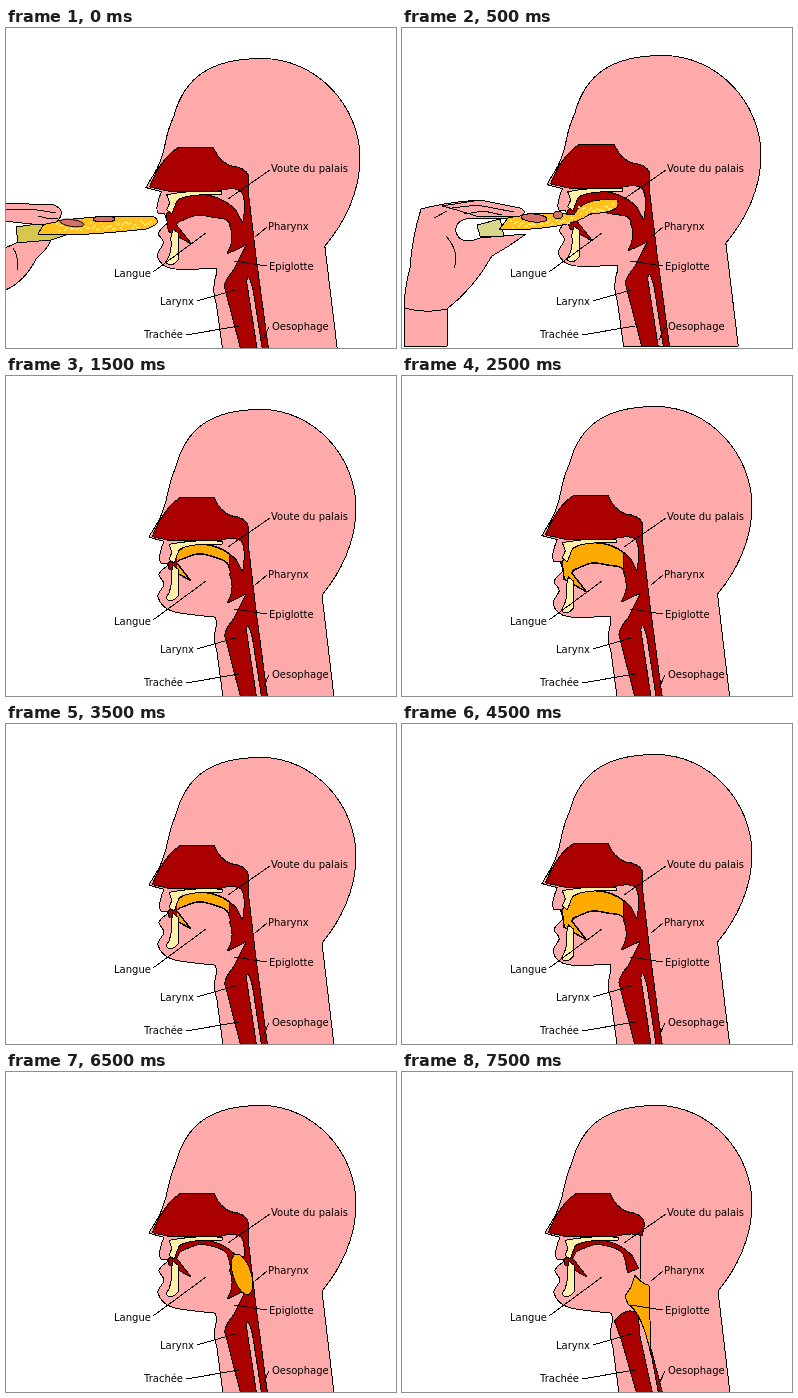
These frames come from a looping animation (390x320 px, 8 s). An HTML page:

```html
<!DOCTYPE html>
<html lang="fr">
<head>
<meta charset="utf-8">
<title>Déglutition</title>
<style>
  html, body { margin: 0; width: 100%; height: 100%; overflow: hidden; background: #fff; }
  svg { display: block; width: 390px; height: 320px; }
  path, ellipse { shape-rendering: crispEdges; stroke-linejoin: round; vector-effect: non-scaling-stroke; }
  text { font: 10px "DejaVu Sans", sans-serif; fill: #000; }
</style>
</head>
<body>
<svg viewBox="0 0 390 320">
  <g id="scene"></g>
  <path fill="none" stroke="#000" d="M264 142L222 171M261 199L249 209M261 238L228 233M263 299L257 312M147 244L200 205M191 273L229 262M180 307L233 298"/>
  <text x="265" y="144">Voute du palais</text>
  <text x="262" y="202">Pharynx</text>
  <text x="263" y="242">Epiglotte</text>
  <text x="266" y="302">Oesophage</text>
  <text x="108" y="249">Langue</text>
  <text x="154" y="277">Larynx</text>
  <text x="138" y="310">Trachée</text>
</svg>
<script>
const SKIN = '#ffaaaa', RED = '#aa0000', FOOD = '#ffaa00', BONE = '#fff0aa', CHEESE = '#ffc220', MEAT = '#d4716a';

const shape = (d, color, extra = '') => `<path d="${d}" fill="${color}" stroke="#000" ${extra}/>`;
const crease = d => shape(d, 'none');
const blob = (x, y, rx, ry, turn, color) =>
  `<ellipse rx="${rx}" ry="${ry}" transform="translate(${x} ${y}) rotate(${turn})" fill="${color}" stroke="#000"/>`;
// Overlapping parts under one outline
const merge = (d, color) => `<path d="${d}" fill="none" stroke="#000" stroke-width="2"/><path d="${d}" fill="${color}"/>`;

// Continues a path smoothly through points
function through(text, move) {
  const p = text.split(' ').map(s => move(...s.split(',').map(Number)));
  const at = i => p[Math.max(0, Math.min(p.length - 1, i))];
  const toward = (i, dir) => at(i).map((v, k) => v + dir * (at(i + 1)[k] - at(i - 1)[k]) / 6);
  return `L${p[0]}` + p.slice(1).map((q, i) => `C${toward(i, 1)} ${toward(i + 1, -1)} ${q}`).join('');
}

const skull = 'M217 321H328L316 219C335 196 350 165 350 132C350 80 308 33 255 33C205 33 180 52 170 90C160 112 164 116 157 134C153 147 147 152 143 161L158 165Q151 182 155 187H161';
const throat = 'L211 247Q206 262 211 276L217 321Z';
const nose = 'M147 160Q158 132 174 122H208Q216 140 231 141Q242 144 242 152';
const noseFloor = 'Q230 159 212 164H165Z';
const openPipes = nose + 'V170L249 230 261 321H256L247 262Q241 240 240 255L250 321H235L220 262Q217 256 228 243L241 217 222 226Q230 212 224 198L230 195 237 196Q241 175 236 165' + noseFloor;
const shutPipes = nose + 'L240 163' + noseFloor + 'M213 249Q224 234 236 242L237 262 250 321H235L220 268ZM249 278L260 321H257Z';
const palate = 'M163 168Q190 163 216 165V168Q180 167 173 174L168 187 163 183 166 176Z';
const tooth = 'M167 189L172 193V220Q165 228 160 222Q167 212 165 198Z';
const swallowed = 'M233 203Q240 212 247 213L249 283Q240 240 226 232L223 224 229 215Z';

function chin(jaw) {
  return through('162,189 153,198 158,208 152,221 166,235 209,241',
    (x, y) => [x + 2 * jaw, y + 8 * jaw * (209 - x) / 55]);
}

// The back of the tongue sinks before its tip
function mouth(jaw, lift) {
  const tongue = through('226,200 221,181 208,174 192,172 174,179',
    (x, y) => [x, y + 16 * lift ** (1 + (226 - x) / 60) * Math.min(1, (226 - x) / 7)]);
  const floor = [[170, 186], [184, 204], [163, 192]].map(([x, y]) => `L${x + 2 * jaw} ${y + 12 * jaw}`).join('');
  return 'M163 187Q168 183 171 177Q178 168 192 168Q215 168 230 184L236 196' + tongue + floor + 'Z';
}

function specks(x0, x1, y0, y1) {
  let seed = 7, d = '';
  const rnd = () => (seed = seed * 16807 % 2147483647) / 2147483647;
  for (let x = x0; x < x1; x += 2) {
    d += `M${x} ${Math.round(y0 + (y1 - y0) * (x - x0) / (x1 - x0) + rnd() * 8 - 4)}h2v2h-2z`;
  }
  return `<path d="${d}" fill="#ffe765"/>`;
}

const farHand = end => shape('M10 199L38 195 34 206 60 207 36 215H12Z', '#d6c84e')
  + shape(`M32 206L38 196Q70 187 ${end - 6} 189q10 6 -8 12Q70 209 32 206Z`, CHEESE)
  + specks(50, end - 8, 199, 195)
  + blob(66, 195, 12, 3.5, 8, MEAT) + blob(98, 191, 11, 3, 0, MEAT)
  + shape('M-3 175L48 177Q62 183 50 194L35 197 -3 193Z', SKIN)
  + crease('M-3 181L25 181 50 185M32 188L44 191 52 190')
  + shape('M-3 221L10 215 44 212Q46 216 30 231Q18 255 -3 263Z', SKIN)
  + crease('M7 220Q13 228 11 242');

const nearHand = () => shape('M2 318V282Q2 262 8 240Q10 210 19 181Q45 174 78 172L120 182 108 190H74Q52 190 54 204Q58 218 78 210L124 206Q108 218 90 228Q72 260 45 281V318Z', SKIN)
  + shape('M75 197L98 191 102 208H78Z', '#d8d68a')
  + shape('M97 202L106 190Q140 182 172 187Q180 169 215 172Q222 184 188 186Q168 202 97 202Z', CHEESE)
  + specks(108, 172, 196, 190) + specks(176, 212, 182, 178)
  + blob(132, 190, 13, 4, 5, MEAT) + blob(156, 187, 5, 4, 0, MEAT)
  + shape('M40 178L78 172 118 180Q127 184 118 188L74 188 55 182Z', SKIN)
  + crease('M50 180L75 177 112 184M62 186L82 183 100 187M2 280Q24 286 45 281M44 208Q58 224 52 240M32 190L45 183');

function scene(t) {
  const biting = t < 1000, chewing = t >= 1000 && t < 5500, swallow = t >= 7500, bite = t === 500;
  const wave = (1 - Math.cos((t - 1500) / 1000 * Math.PI)) / 2;
  const jaw = biting ? 1 : chewing && t >= 1500 ? wave : 0;
  const lift = biting ? 1 : chewing ? 0.5 + 0.5 * jaw : 0;

  // The head leans back as the jaw opens
  const x = 143 - 3 * jaw, y = 33.5 - 3 * jaw;
  const sx = ((biting ? 354 : 350) - x) / 207, sy = (320 - y) / 287;
  const oral = mouth(jaw, lift);

  let s = shape(skull + chin(jaw) + throat, SKIN);
  if (swallow) s += crease('M238 163V207');
  s += merge((swallow ? shutPipes : openPipes) + oral, RED);
  if (chewing) {
    const left = 171 - 8 * jaw;
    s += `<clipPath id="chewed"><rect x="${left}" y="150" width="${223 - left}" height="80"/></clipPath>`
      + shape(oral, FOOD, 'clip-path="url(#chewed)"')
      + crease(`M223 177V${184 + 10 * lift}`);
  } else if (swallow) {
    s += shape(swallowed, FOOD);
  } else if (!biting) {
    const p = (t - 5500) / 1000;
    s += blob(213 + 23 * p, 184 + 18 * p, 21, 11 - 2 * p, 32 + 40 * p, FOOD);
  }
  s += shape(palate, BONE) + shape(tooth, BONE, `transform="translate(${2 * jaw} ${13 * jaw})"`);
  const shift = bite ? [5, -3] : [0, 0];
  s = `<g transform="translate(${x + shift[0]} ${y + shift[1]}) scale(${sx} ${sy}) translate(-143 -33)">${s}</g>`;

  if (bite) s += nearHand();
  else if (biting) s += farHand(154);
  else if (t === 1000) s += `<g transform="translate(-8 3)">${farHand(114)}</g>`;
  return s;
}

// Poses are held: half a second at first, a full second once the food is gathered
const hold = t => t < 5500 ? t - t % 500 : t - (t - 5500) % 1000;

const stage = document.getElementById('scene');
let shown = -1;
function tick() {
  const t = hold(performance.now() % 8000);
  if (t !== shown) stage.innerHTML = scene(shown = t);
  requestAnimationFrame(tick);
}
tick();
</script>
</body>
</html>
```
